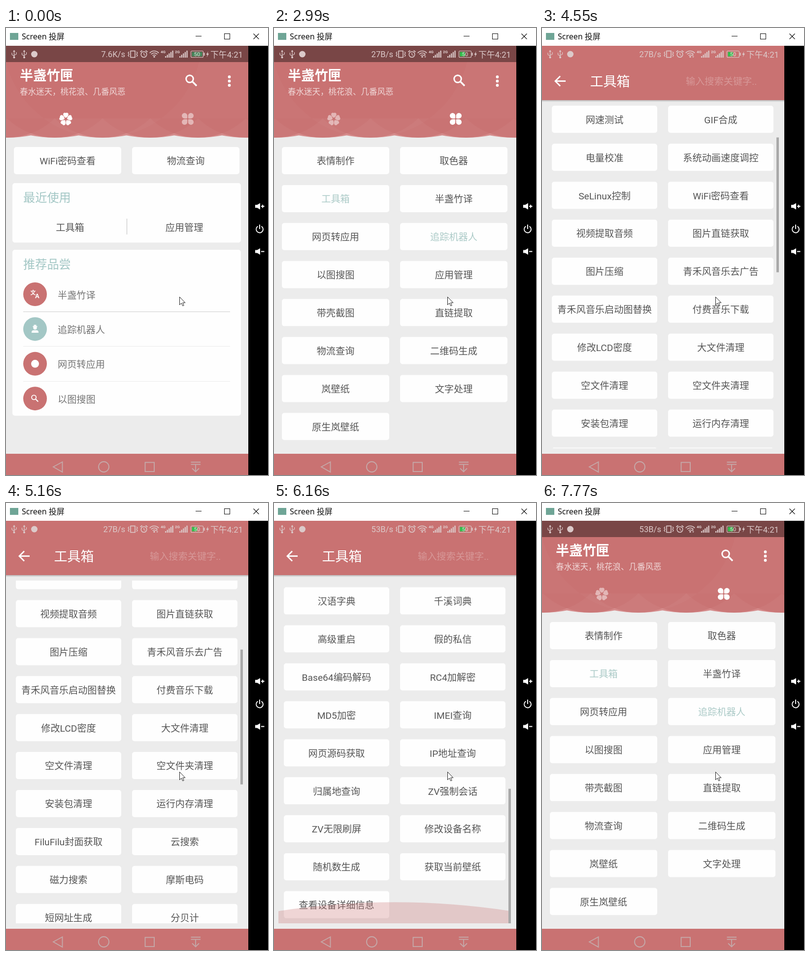
Animation of 532 by 905 pixels, one loop 8000 ms. Source, as an HTML page with a canvas:

```html
<!DOCTYPE html>
<html lang="zh-CN">
<head>
<meta charset="utf-8">
<title>Screen 投屏</title>
<style>
html, body { margin: 0; width: 100%; height: 100%; overflow: hidden; background: #000; }
canvas { display: block; width: 532px; height: 905px; }
</style>
</head>
<body>
<canvas id="stage" width="532" height="905"></canvas>
<script>
const c = document.getElementById('stage').getContext('2d');
const LOOP = 8000, TAU = Math.PI * 2, PITCH = 76.9, PHONE_W = 492, NAV_Y = 862;
const RED = '#c97272', TEAL = '#a3c7c5', BG = '#ececec', INK = '#555';
const SANS = 'Roboto, "Noto Sans CJK SC", "Noto Sans CJK", sans-serif';
const UI = '"Noto Sans", "Noto Sans CJK SC", "Noto Sans CJK", sans-serif';

const homeItems = ['表情制作', '取色器', '工具箱', '半盏竹译', '网页转应用', '追踪机器人', '以图搜图',
  '应用管理', '带壳截图', '直链提取', '物流查询', '二维码生成', '岚壁纸', '文字处理', '原生岚壁纸'];
const toolItems = ['文字转图', '图片文字化', '短信伪造', '图片拼接', '网速测试', 'GIF合成', '电量校准',
  '系统动画速度调控', 'SeLinux控制', 'WiFi密码查看', '视频提取音频', '图片直链获取', '图片压缩',
  '青禾风音乐去广告', '青禾风音乐启动图替换', '付费音乐下载', '修改LCD密度', '大文件清理', '空文件清理',
  '空文件夹清理', '安装包清理', '运行内存清理', 'FiluFilu封面获取', '云搜索', '磁力搜索', '摩斯电码',
  '短网址生成', '分贝计', '汉语字典', '千溪词典', '高级重启', '假的私信', 'Base64编码解码', 'RC4加解密',
  'MD5加密', 'IMEI查询', '网页源码获取', 'IP地址查询', '归属地查询', 'ZV强制会话', 'ZV无限刷屏',
  '修改设备名称', '随机数生成', '获取当前壁纸', '查看设备详细信息'];

// timing
const span = (t, a, b) => Math.min(1, Math.max(0, (t - a) / (b - a)));
const smooth = u => u * u * (3 - 2 * u);
const easeOut = u => 1 - (1 - u) ** 3;
const flick = u => smooth(1 - (1 - u) ** 1.5);

// drawing helpers; y of text is its visual middle
function text(s, x, y, size, color, align = 'left', weight = 400, font = SANS) {
  c.font = `${weight} ${size}px ${font}`;
  c.textAlign = align;
  c.fillStyle = color;
  c.fillText(s, x, y + size * 0.37);
}
function rect(x, y, w, h, color) {
  c.fillStyle = color;
  c.fillRect(x, y, w, h);
}
function round(x, y, w, h, r, color) {
  c.fillStyle = color;
  c.beginPath();
  c.roundRect(x, y, w, h, r);
  c.fill();
}
function disc(x, y, r, color) {
  c.fillStyle = color;
  c.beginPath();
  c.arc(x, y, r, 0, TAU);
  c.fill();
}
function ring(x, y, r, color, w) {
  c.strokeStyle = color;
  c.lineWidth = w;
  c.beginPath();
  c.arc(x, y, r, 0, TAU);
  c.stroke();
}
function path(pts) {
  c.beginPath();
  for (let i = 0; i < pts.length; i += 2) c.lineTo(pts[i], pts[i + 1]);
}
function line(color, w, ...pts) {
  c.strokeStyle = color;
  c.lineWidth = w;
  path(pts);
  c.stroke();
}
function poly(color, ...pts) {
  c.fillStyle = color;
  path(pts);
  c.fill();
}
function at(x, y, draw) {
  c.save();
  c.translate(x, y);
  draw();
  c.restore();
}
function clipped(x, y, w, h, draw) {
  c.save();
  c.beginPath();
  c.rect(x, y, w, h);
  c.clip();
  draw();
  c.restore();
}
function card(x, y, w, label, color = INK) {
  round(x, y, w, 55, 5, '#fefefe');
  text(label, x + w / 2, y + 28.3, 19.2, color, 'center');
}
function magnifier(x, y, k, color) {
  ring(x - 3 * k, y - 3 * k, 7.3 * k, color, 2.9 * k);
  line(color, 3.4 * k, x + 2.5 * k, y + 2.5 * k, x + 11 * k, y + 11 * k);
}

// a row of circles merged into one shape, all touching y = 222
function scallops(x0, step, r, color) {
  c.fillStyle = color;
  c.beginPath();
  for (let x = x0; x < PHONE_W + r; x += step) {
    c.moveTo(x + r, 222 - r);
    c.arc(x, 222 - r, r, 0, TAU);
  }
  c.fill();
}
function homeHeader(tab) {
  clipped(0, 69, PHONE_W, 154, () => {
    scallops(-95, 97, 260, '#d58b8b');
    scallops(-95, 194, 140, 'rgba(201,114,114,.75)');
    scallops(2, 194, 140, 'rgba(201,114,114,.75)');
    rect(0, 69, PHONE_W, 114, RED);
    c.fillStyle = 'rgba(255,255,255,.025)';
    c.beginPath();
    c.rect(0, 69, PHONE_W, 114);
    c.moveTo(398, 20);
    c.arc(196, 20, 202, 0, TAU);
    c.fill('evenodd');
  });
  rect(0, 36, PHONE_W, 33, '#794646');
  text('半盏竹匣', 28, 96, 27.2, '#fff', 'left', 700);
  text('春水迷天，桃花浪、几番风恶', 28, 129, 16.5, 'rgba(255,255,255,.72)');
  magnifier(376, 106, 1, '#fff');
  for (const y of [99, 107.5, 116]) disc(453.5, y, 2.9, '#fff');

  c.globalAlpha = 1 - 0.52 * tab;
  at(121.5, 184.5, () => {
    for (let i = 0; i < 5; i++) {
      c.rotate(TAU / 5);
      c.fillStyle = '#fff';
      c.beginPath();
      c.moveTo(0, -2.5);
      c.bezierCurveTo(-9, -8, -5, -15, -0.3, -12.5);
      c.bezierCurveTo(5, -15, 9, -8, 0, -2.5);
      c.fill();
    }
  });
  c.globalAlpha = 0.48 + 0.52 * tab;
  at(369, 184, () => {
    for (let i = 0; i < 4; i++) {
      c.rotate(TAU / 4);
      round(-12, -12, 11.2, 11.2, [6, 6, 1.5, 6], '#fff');
    }
  });
  c.globalAlpha = 1;
}

const badges = [
  ['半盏竹译', RED, () => {
    text('文', -4, -3, 11, '#fff', 'center', 700);
    text('A', 4.5, 3.5, 13, '#fff', 'center', 700);
  }],
  ['追踪机器人', TEAL, () => {
    disc(0, -2.5, 3.6, '#fff');
    rect(-4.5, -6, 9, 2, '#fff');
    rect(-2.5, -8.5, 5, 2, '#fff');
    round(-7, 2.5, 14, 5, [4, 4, 0, 0], '#fff');
  }],
  ['网页转应用', RED, () => disc(0, 0, 8, '#fff')],
  ['以图搜图', RED, () => magnifier(-0.5, -0.5, 0.62, '#fff')]
];
function firstTab() {
  card(16, 241, 218, 'WiFi密码查看');
  card(256, 241, 218, '物流查询');
  round(13, 314, 464, 120.5, 5, '#fefefe');
  text('最近使用', 35, 343.5, 24.2, TEAL);
  text('工具箱', 130, 403.5, 19.2, INK, 'center');
  text('应用管理', 362, 403.5, 19.2, INK, 'center');
  rect(245, 386, 1, 32, '#bdbdbd');
  round(13, 449, 464, 336, 5, '#fefefe');
  text('推荐品尝', 35, 478, 24.2, TEAL);
  badges.forEach(([label, color, icon], i) => {
    const y = 539 + i * 70.4;
    disc(59, y, 24, color);
    at(59, y, icon);
    text(label, 105, y + 1.5, 19.2, '#757575');
    if (i < 3) rect(35, Math.round(y + 35), 420, 1, i ? '#ebebeb' : '#cfcfcf');
  });
}
function secondTab() {
  homeItems.forEach((s, i) => {
    const teal = s === '工具箱' || s === '追踪机器人';
    card(i % 2 ? 256 : 16, 241 + (i >> 1) * PITCH, 218, s, teal ? '#abcac7' : INK);
  });
}
function home(tab) {
  rect(0, 36, PHONE_W, 869, BG);
  clipped(0, 195, PHONE_W, NAV_Y - 195, () => {
    if (tab < 1) at(-PHONE_W * tab, 0, firstTab);
    if (tab > 0) at(PHONE_W * (1 - tab), 0, secondTab);
  });
  homeHeader(tab);
  rect(0, NAV_Y, PHONE_W, 905 - NAV_Y, RED);
}

function scrollAt(t) {
  return 356 * flick(span(t, 4230, 5150)) + 254 * flick(span(t, 5160, 5690)) +
    464 * span(t, 5700, 6080) ** 1.4;
}
function glow(t) {
  const rise = span(t, 6080, 6160), fall = easeOut(span(t, 6160, 6720));
  const k = rise * (1 - fall);
  if (!k) return;
  c.fillStyle = `rgba(201,114,114,${0.3 * Math.sqrt(k)})`;
  c.beginPath();
  c.moveTo(9, 851);
  c.lineTo(9, 851 - 25 * k);
  c.quadraticCurveTo(245, 851 - 61 * k, 481, 851 - 25 * k);
  c.lineTo(481, 851);
  c.fill();
}
function toolbox(t) {
  const scroll = scrollAt(t);
  rect(0, 36, PHONE_W, 869, BG);
  clipped(9, 157, 474, 694, () => {
    toolItems.forEach((s, i) => {
      const y = 168 + (i >> 1) * PITCH - scroll;
      if (y > 100 && y < 852) card(i % 2 ? 256 : 20, y, 214, s);
    });
    glow(t);
    c.globalAlpha = 1 - span(t, 6770, 7120);
    rect(476, 157 + scroll * 694 / 1768, 5, 273, '#a9a9a9');
    c.globalAlpha = 1;
  });
  const shade = c.createLinearGradient(0, 146, 0, 150);
  shade.addColorStop(0, 'rgba(0,0,0,.22)');
  shade.addColorStop(1, 'rgba(0,0,0,0)');
  rect(0, 146, PHONE_W, 4, shade);
  rect(0, 36, PHONE_W, 110, RED);
  line('#fff', 2.8, 48, 107.5, 27, 107.5);
  line('#fff', 2.8, 37, 97.5, 27, 107.5, 37, 117.5);
  text('工具箱', 97.5, 108.5, 27, '#fff', 'left', 500);
  text('输入搜索关键字..', 292, 108, 19.2, 'rgba(255,255,255,.27)');
  rect(0, NAV_Y, PHONE_W, 905 - NAV_Y, RED);
}

function usb(x) {
  line('#dccaca', 1.3, x, 47, x, 59);
  poly('#dccaca', x - 2.5, 48, x, 44.5, x + 2.5, 48);
  line('#dccaca', 1.2, x, 57, x - 4.5, 54, x - 4.5, 50);
  line('#dccaca', 1.2, x, 55.5, x + 4.5, 53, x + 4.5, 49);
  disc(x, 59.5, 2, '#dccaca');
}
function signal(x, label) {
  text(label, x - 9, 48, 8, '#e2d2d2', 'left', 700);
  for (let i = 0; i < 5; i++) rect(x + i * 3.6, 57 - i * 2.8, 2.3, 3 + i * 2.8, '#dccaca');
}
function statusBar(t) {
  const ink = '#dccaca';
  usb(16.5);
  usb(37);
  disc(57.5, 53, 6.5, ink);
  const speed = t < 680 ? '7.6K/s' : t < 5920 ? '27B/s' : '53B/s';
  text(speed, 242, 53, 16.6, ink, 'right');
  c.strokeStyle = ink;
  c.lineWidth = 1.6;
  c.strokeRect(253, 46.5, 9, 13);
  for (const d of [-1, 1]) {
    const x = 257.5 + d * 7.5;
    line(ink, 1.3, x, 48, x + d * 2, 50.5, x, 53, x + d * 2, 55.5, x, 58);
    line(ink, 1.6, 280 + d * 3.5, 45.5, 280 + d * 7.5, 48.5);
  }
  ring(280, 53.5, 5.8, ink, 1.5);
  line(ink, 1.2, 280, 50, 280, 54, 283, 55.5);
  c.lineWidth = 1.7;
  for (const r of [4.5, 8.5, 12.5]) {
    c.beginPath();
    c.arc(301, 59, r, -2.4, -0.74);
    c.stroke();
  }
  disc(301, 58.3, 1.7, ink);
  if (t >= 70) {
    poly(ink, 304, 56, 306, 53, 308, 56);
    if (t < 2680 || t > 2990) poly(ink, 305, 57.5, 309, 57.5, 307, 60);
  }
  signal(323, '4G');
  signal(352, '2G');
  if (t < 1370) rect(377.5, 48.5, 21, 9, '#47885d');
  else rect(377.5, 48.5, 10.5, 9, '#35c050');
  c.strokeStyle = ink;
  c.lineWidth = 1.1;
  c.beginPath();
  c.roundRect(375.5, 46.5, 25, 13, 2);
  c.stroke();
  rect(401.5, 50, 2, 6, ink);
  text('50', 388, 53.2, 11, '#eadede', 'center');
  poly(ink, 410.5, 47, 406.5, 54, 409, 54, 407.5, 59.5, 412, 51.8, 409.4, 51.8);
  text('下午4:21', 481, 53.3, 16.8, ink, 'right');
}
function navIcons() {
  const ink = '#c5a8a8';
  c.strokeStyle = ink;
  c.lineWidth = 1.9;
  path([96, 888.5, 114.5, 878.5, 114.5, 899]);
  c.closePath();
  c.stroke();
  ring(198.5, 888.5, 10.5, ink, 1.9);
  c.strokeRect(282.5, 879.5, 18.5, 18.5);
  line(ink, 1.9, 375.5, 879, 395, 879);
  line(ink, 1.9, 375.5, 883.5, 395, 883.5);
  line(ink, 1.9, 385, 884, 385, 898);
  line(ink, 1.9, 378, 891.5, 385, 898.5, 392, 891.5);
}

function speaker(y, plus) {
  poly('#fff', 506, y - 3, 510, y - 3, 516, y - 6.5, 516, y + 6.5, 510, y + 3, 506, y + 3);
  rect(518, y - 1, 6.5, 2, '#fff');
  if (plus) rect(520.2, y - 3.2, 2, 6.5, '#fff');
}
function windowFrame() {
  rect(0, 0, 532, 36, '#fff');
  rect(8, 10, 17, 14, '#6fa596');
  text('Screen 投屏', 32, 17.5, 16, '#111', 'left', 400, UI);
  rect(385, 16, 12, 1, '#111');
  c.strokeStyle = '#111';
  c.lineWidth = 1;
  c.strokeRect(443.5, 11.5, 11, 11);
  line('#111', 1.1, 502.5, 11.5, 513.5, 22.5);
  line('#111', 1.1, 513.5, 11.5, 502.5, 22.5);
  rect(PHONE_W, 36, 40, 869, '#000');
  speaker(361, true);
  speaker(452.5, false);
  c.strokeStyle = '#fff';
  c.lineWidth = 1.8;
  c.beginPath();
  c.arc(515, 407.5, 7, -1.05, 4.19);
  c.stroke();
  line('#fff', 1.9, 515, 398, 515, 407);
}
function cursor() {
  path([352.5, 544.5, 352.5, 560.5, 356.2, 557, 358.8, 562.6, 361.2, 561.6, 358.8, 556.2, 363.8, 556.2]);
  c.closePath();
  c.fillStyle = '#fff';
  c.fill();
  c.strokeStyle = '#222';
  c.lineWidth = 1;
  c.stroke();
}

function draw(t) {
  const tab = flick(span(t, 1830, 2560));
  const open = easeOut(span(t, 3010, 3580)) - smooth(span(t, 7300, 7740));
  if (open < 1) at(-PHONE_W * 0.25 * open, 0, () => home(tab));
  if (open > 0) {
    if (open < 1) rect(0, 36, PHONE_W, 869, `rgba(0,0,0,${0.25 * open})`);
    at(PHONE_W * (1 - open), 0, () => toolbox(t));
  }
  statusBar(t);
  navIcons();
  windowFrame();
  cursor();
}

const start = performance.now();
function tick() {
  draw((performance.now() - start) % LOOP);
  requestAnimationFrame(tick);
}
tick();
</script>
</body>
</html>
```
